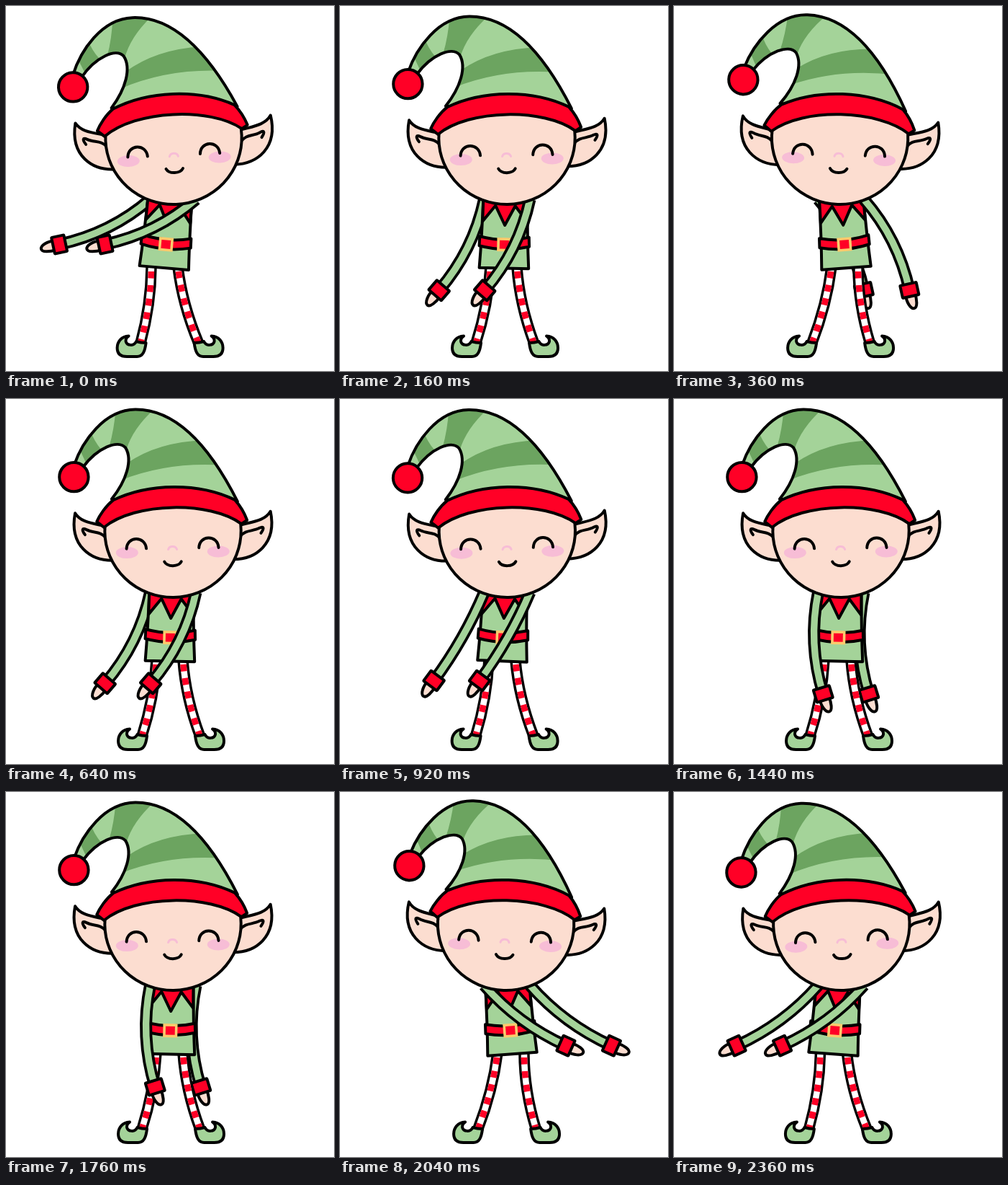
Write an HTML page that moves like this. It is 456 px wide and 506 px high and loops after 2400 ms.

```html
<!DOCTYPE html>
<html lang="en">
<head>
<meta charset="utf-8">
<title>Dancing elf</title>
<style>
  html, body { margin: 0; width: 100%; height: 100%; overflow: hidden; background: #fff; }
  svg { display: block; width: 100%; height: 100%; }
  .ink { stroke: #000; stroke-width: 4; stroke-linejoin: round; stroke-linecap: round; }
  .line { fill: none; stroke: #000; stroke-width: 4; stroke-linecap: round; stroke-linejoin: round; }
  .green { fill: #a4d399; }
  .dark { fill: #6ca460; }
  .red { fill: #ff0026; }
  .skin { fill: #fcddd0; }
  .pink { fill: #f7bdd6; }
  .none { fill: none; }
</style>
</head>
<body>
<svg viewBox="0 0 456 506" xmlns="http://www.w3.org/2000/svg">
  <defs>
    <path id="hatShape" d="M147,138 C168,112 177,84 167,67 C157,55 128,66 107,94 L95,91 C107,57 138,14 181,14 C240,14 286,70 322,143 Z"/>
    <clipPath id="hatClip"><use href="#hatShape"/></clipPath>
    <path id="shoe" class="ink green" d="M183,465 C180,472 170,471 168.500,465 C168,461 170,459 172.500,457.500 C162,458 156.500,466 156.500,474 C156.500,483 162,486 170,486 L184,486 C192,486 195,479 196.500,467 Q189,467 183,465 Z"/>
    <g id="ear">
      <path class="ink skin" d="M150,223 C117,224 87,202 96,157 C104,170 120,171 140,176 Z"/>
      <path class="line" d="M109.500,187 C104.500,180 105.500,177 111.500,180 C121,185 131,182 138,191"/>
    </g>
  </defs>

  <g id="back"></g>
  <g id="legs"></g>
  <g id="feet">
    <use href="#shoe"/>
    <use href="#shoe" transform="translate(460 0) scale(-1 1)"/>
  </g>

  <g id="torso">
    <path class="ink green" d="M200,262 L261,262 Q262,320 264.800,363.500 L196.200,363.500 Q199,320 200,262 Z"/>
    <path class="ink red" d="M200,262 L199.500,299 L217,277 L230.500,304 L244.500,277 L261.500,299 L261,262 Z"/>
    <path class="ink red" d="M196,320 Q230.500,328.500 264.500,320 L265,333 Q230.500,341.500 195.500,333 Z"/>
    <rect class="red" x="222" y="323" width="16.500" height="15.500" stroke="#fbca6c" stroke-width="3.600"/>
  </g>

  <g id="front"></g>

  <g id="head">
    <use href="#ear"/>
    <use href="#ear" transform="translate(463.600 0) scale(-1 1)"/>
    <ellipse class="ink skin" cx="231.700" cy="183" rx="94.700" ry="92"/>
    <ellipse class="pink" cx="167.700" cy="212.500" rx="15.500" ry="8"/>
    <ellipse class="pink" cx="294.700" cy="212" rx="15.500" ry="8"/>
    <path class="line" d="M167,207 C168,189 193,189 194.500,207"/>
    <path class="line" d="M267.700,206.500 C268.700,188.500 293.700,188.500 295,206.500"/>
    <path class="none" stroke="#f7bdd6" stroke-width="3" stroke-linecap="round" d="M225,208.500 C226.500,203 235.500,203 237,208.500"/>
    <path class="line" d="M219.500,225.500 C223.500,233 239,233 243,225.500"/>
    <use href="#hatShape" class="green"/>
    <g clip-path="url(#hatClip)" class="dark">
      <path d="M102,66 L118,42 Q123,57 133,69 L113,90 Z"/>
      <path d="M154,10 L212,10 Q178,38 168,70 L144,66 Q152,40 154,10 Z"/>
      <path d="M168,89 Q212,59 276,58 L306,93 Q228,86 160,112 Z"/>
    </g>
    <use href="#hatShape" class="ink none"/>
    <path class="ink red" d="M126,169 C130,160 139,147 149,139.500 C199,116 268,116 318,140.500 C324,147 331,158 335,169 L327,174 C284,142 180,142 136,177 Q130,172 126,169 Z"/>
    <circle class="ink red" cx="94.800" cy="106.800" r="20.200"/>
  </g>
</svg>
<script>
const STEP = 40, LOOP = 2400, BEAT = 400;
const SWAY = [-1, 1, -1, 1, -1, 1, -1];
const SWING = [-63.7, 34.5, -63.7, 63.7, -34.5, 63.7, -63.7];
const BEND = [1, 1, 1, -1, -1, -1, 1];

const $ = id => document.getElementById(id);
const back = $('back'), front = $('front');

function group(parent, html) {
  const g = document.createElementNS('http://www.w3.org/2000/svg', 'g');
  g.innerHTML = html;
  parent.appendChild(g);
  return g;
}

const makeArm = x => ({
  x,
  el: group(front, `
    <path class="limb none" stroke="#000" stroke-width="17"/>
    <path class="limb none" stroke="#a4d399" stroke-width="9.400"/>
    <g>
      <path class="ink skin" d="M-6.500,5 C-8,15 -4,26 1,26 C6,26 7.500,15 6.500,5 Z"/>
      <rect class="ink red" x="-11.500" y="-8.800" width="23" height="17.600" rx="1"/>
    </g>`)
});

const makeLeg = (top, foot, bow) => ({
  top, foot, bow,
  el: group($('legs'), `
    <path class="limb none" stroke="#000" stroke-width="15.500"/>
    <path class="limb none" stroke="#fff" stroke-width="8.600"/>
    <path class="limb none" stroke="#ff0026" stroke-width="8.600" stroke-dasharray="9.500 9.500" stroke-dashoffset="-6"/>`)
});

const arms = [makeArm(200.5), makeArm(264)];
const legs = [makeLeg(211.2, 189.7, 7), makeLeg(248.2, 270.2, -8)];

const ease = p => p - 0.22 * Math.sin(2 * Math.PI * p) / (2 * Math.PI);

function setLimb(el, d) {
  el.querySelectorAll('.limb').forEach(p => p.setAttribute('d', d));
}

function poseArm(arm, angle, bend, behind) {
  const layer = behind ? back : front;
  if (arm.el.parentNode !== layer) layer.appendChild(arm.el);
  arm.el.setAttribute('transform', `translate(${arm.x} 268) rotate(${-angle})`);
  setLimb(arm.el, `M0,0 Q${18 * bend},70 0,141`);
  const tilt = Math.atan2(18 * bend, 71) * 180 / Math.PI;
  arm.el.lastElementChild.setAttribute('transform', `translate(0 141) rotate(${tilt})`);
}

function poseLeg(leg, sway) {
  const top = leg.top + 9.2 * sway, foot = leg.foot + 2.6 * sway;
  const mid = (top + foot) / 2 + leg.bow;
  setLimb(leg.el, `M${top},362 Q${mid},414 ${foot},467`);
}

function draw(t) {
  const beat = Math.floor(t / BEAT), q = ease(t / BEAT - beat);
  const at = keys => keys[beat] + (keys[beat + 1] - keys[beat]) * q;
  const sway = at(SWAY), angle = at(SWING), bend = at(BEND);

  // Each arm passes behind the body in its own half of the loop.
  poseArm(arms[0], angle, bend, beat < 2);
  poseArm(arms[1], angle, bend, beat === 3 || beat === 4);
  legs.forEach(leg => poseLeg(leg, sway));
  $('feet').setAttribute('transform', `translate(${1.9 * sway} 0)`);
  $('torso').setAttribute('transform', `rotate(${-4.9 * sway} 230.4 238)`);
  $('head').setAttribute('transform', `rotate(${2.3 * sway} 232 150)`);
}

const start = performance.now();
function tick() {
  const t = (performance.now() - start) % LOOP;
  draw(Math.floor(t / STEP) * STEP);
  requestAnimationFrame(tick);
}
tick();
</script>
</body>
</html>
```
